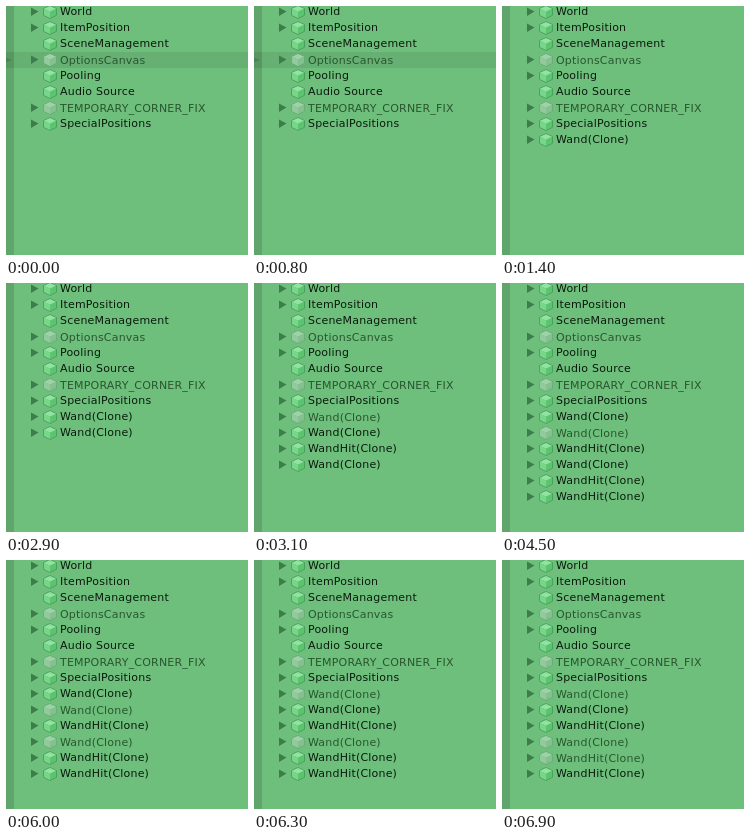
An HTML page for the animation above (7200 ms loop, 242 by 249 pixels).

```html
<!DOCTYPE html>
<html lang="en">
<head>
<meta charset="utf-8">
<title>Object hierarchy</title>
<style>
  html, body { margin: 0; width: 100%; height: 100%; overflow: hidden; background: #6ebf7c; }
  svg { display: block; width: 242px; height: 249px; }
  text { font: 11px "DejaVu Sans", Verdana, sans-serif; letter-spacing: .2px; fill: #0a1a0d; }
  .arrow { fill: #3d7d4b; }
  .top { fill: #90e3a0; }
  .left { fill: #78d68a; }
  .right { fill: #5cc371; }
  .edge { fill: none; stroke: #459a57; stroke-width: .8; }
  .dim text { fill: #29562f; transform: translateY(1px); }
  .dim .top { fill: #9fd2a8; }
  .dim .left { fill: #93ca9d; }
  .dim .right { fill: #85c091; }
  .dim .edge { stroke: #67a774; }
</style>
</head>
<body>
<svg viewBox="0 0 242 249">
  <rect width="242" height="249" fill="#6ebf7c"/>
  <rect width="8" height="249" fill="#5fa56c"/>
  <g id="hover">
    <rect y="46" width="242" height="16" fill="#66b073"/>
    <rect y="46" width="8" height="16" fill="#58975f"/>
    <path d="M0 51.500L6 54L0 56.500Z" fill="#4b8557"/>
  </g>
  <g id="list"></g>
</svg>
<script>
const LOOP = 7200, ROW = 16, FIRST_SPAWN = 1400;
const HIDDEN = 0, ON = 1, DIM = 2;

// name, time the fold arrow appears (null: never), steps of [time, state]
const rows = [
  ["World", 0, [[0, ON]]],
  ["ItemPosition", 0, [[0, ON]]],
  ["SceneManagement", null, [[0, ON]]],
  ["OptionsCanvas", 0, [[0, DIM]]],
  ["Pooling", FIRST_SPAWN, [[0, ON]]],
  ["Audio Source", null, [[0, ON]]],
  ["TEMPORARY_CORNER_FIX", 0, [[0, DIM]]],
  ["SpecialPositions", 0, [[0, ON]]],
  ["Wand(Clone)", 0, [[FIRST_SPAWN, ON], [3100, DIM], [4500, ON], [6300, DIM]]],
  ["Wand(Clone)", 0, [[2200, ON], [4000, DIM], [6200, ON]]],
  ["WandHit(Clone)", 0, [[3000, ON]]],
  ["Wand(Clone)", 0, [[3000, ON], [4700, DIM]]],
  ["WandHit(Clone)", 0, [[3600, ON], [6800, DIM]]],
  ["WandHit(Clone)", 0, [[4500, ON]]]
];

const hover = document.getElementById("hover");
const list = document.getElementById("list");

function add(parent, tag, attrs) {
  const node = document.createElementNS("http://www.w3.org/2000/svg", tag);
  for (const key in attrs) node.setAttribute(key, attrs[key]);
  return parent.appendChild(node);
}

const views = rows.map(([name, arrowAt, steps], i) => {
  const group = add(list, "g", { transform: `translate(0 ${i * ROW})` });
  const arrow = arrowAt === null ? null
    : add(group, "path", { class: "arrow", d: "M25 1.500L32.500 5.500L25 10Z" });
  const cube = {
    top: "M44 -.5L50.500 2.500L44 5.800L37.500 2.500Z",
    left: "M37.500 2.500L44 5.800V12.500L37.500 9.300Z",
    right: "M50.500 2.500L44 5.800V12.500L50.500 9.300Z",
    edge: "M44 -.5L50.500 2.500V9.300L44 12.500L37.500 9.300V2.500Z"
  };
  for (const face in cube) add(group, "path", { class: face, d: cube[face] });
  add(group, "text", { x: 54, y: 9 }).textContent = name;
  return { group, arrow, arrowAt, steps };
});

const show = (node, visible) => node.setAttribute("visibility", visible ? "inherit" : "hidden");

function stateAt(steps, time) {
  let state = HIDDEN;
  for (const [start, next] of steps) if (time >= start) state = next;
  return state;
}

function draw(now) {
  const time = now % LOOP;
  show(hover, time < FIRST_SPAWN);
  for (const { group, arrow, arrowAt, steps } of views) {
    const state = stateAt(steps, time);
    show(group, state !== HIDDEN);
    group.setAttribute("class", state === DIM ? "dim" : "");
    if (arrow) show(arrow, time >= arrowAt);
  }
}

let start = null;
function tick(now) {
  if (start === null) start = now;
  draw(now - start);
  requestAnimationFrame(tick);
}
draw(0);
requestAnimationFrame(tick);
</script>
</body>
</html>
```
